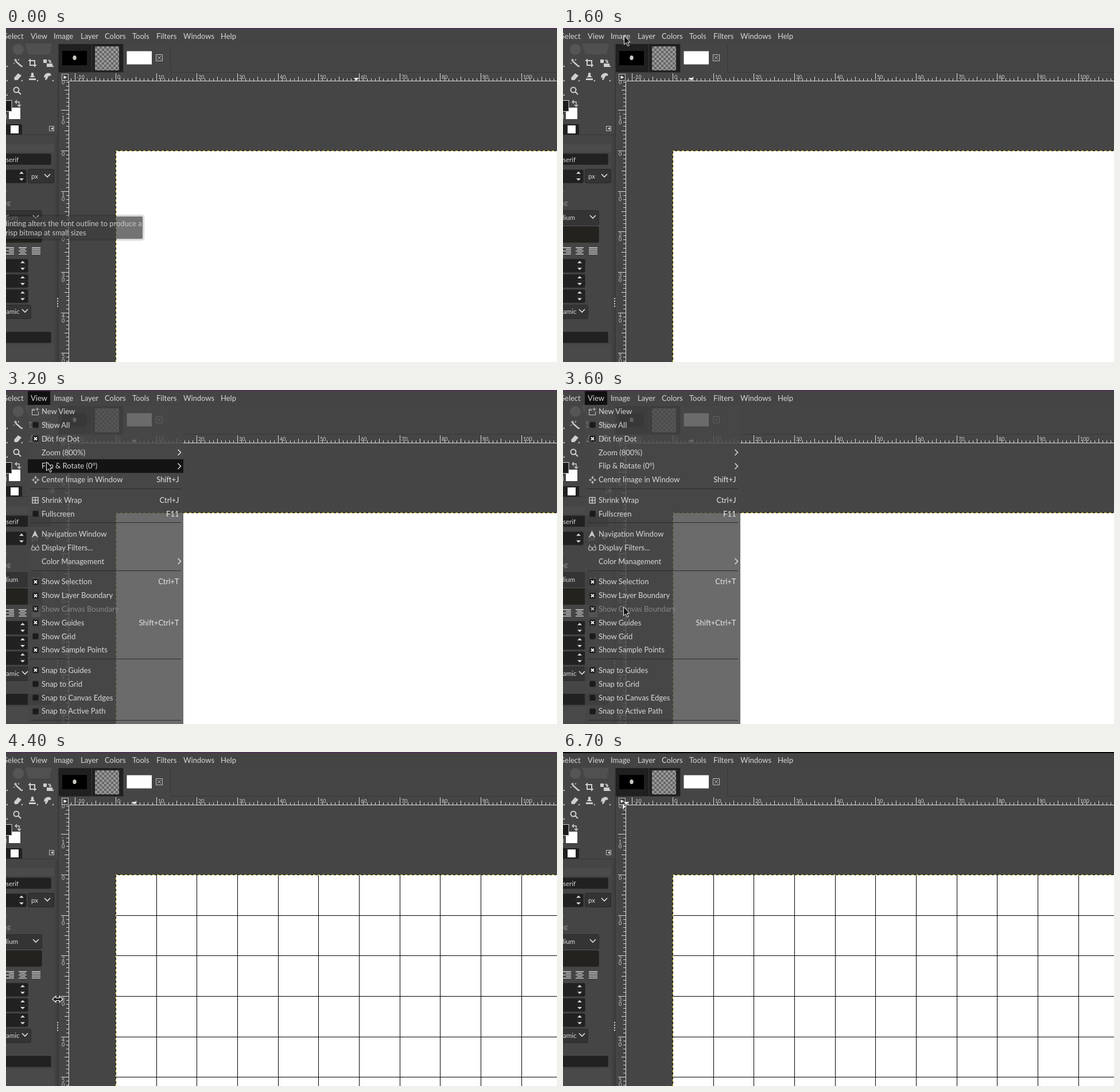
These frames come from a looping animation (960 by 583 pixels, 7.1 s). An HTML page:

```html
<!DOCTYPE html>
<html lang="en">
<head>
<meta charset="utf-8">
<title>Show Grid</title>
<style>
html, body { margin: 0; width: 100%; height: 100%; overflow: hidden; background: #454545; }
svg { display: block; width: 960px; height: 583px; font: 13px Lato, "Noto Sans", sans-serif; }
</style>
</head>
<body>
<svg id="stage" viewBox="0 0 960 583" xmlns="http://www.w3.org/2000/svg"></svg>
<script>
const LOOP = 7100, STEP = 100, W = 960, H = 583;
const CELL = 70.69, X0 = 191.42, Y0 = 214.4;
const INK = '#d8d8d8', DARK = '#212121', BG = '#454545', PURPLE = '#4d3152';
const stage = document.getElementById('stage');

function el(tag, attrs, parent = stage) {
  const n = document.createElementNS('http://www.w3.org/2000/svg', tag);
  for (const k in attrs) n.setAttribute(k, attrs[k]);
  parent.appendChild(n);
  return n;
}
const group = (parent = stage) => el('g', {}, parent);
const rect = (x, y, width, height, fill, parent, more) =>
  el('rect', { x, y, width, height, fill, ...more }, parent);
const fillPath = (d, fill, parent, more) => el('path', { d, fill, ...more }, parent);
const line = (d, stroke, parent, width = 1, more) =>
  el('path', { d, fill: 'none', stroke, 'stroke-width': width, ...more }, parent);
function text(s, x, y, parent, more) {
  const n = el('text', { x, y, fill: INK, ...more }, parent);
  n.textContent = s;
  return n;
}
const show = (n, on) => n.setAttribute('display', on ? 'inline' : 'none');
const move = (n, x, y) => n.setAttribute('transform', `translate(${x} ${y})`);
const gx = u => Math.floor(X0 + CELL * u / 10) + 0.5;
const gy = u => Math.floor(Y0 + CELL * u / 10) + 0.5;

// Window and canvas
rect(0, 0, W, H, BG);
rect(0, 2, W, 26, '#444');
const strip = rect(0, 0, W, 2, PURPLE);
rect(191, 214, 769, 369, '#fff');

const grid = group();
let d = '';
for (let u = 10; u <= 100; u += 10) d += `M${gx(u)} 215V${H}`;
for (let u = 10; u <= 50; u += 10) d += `M192 ${gy(u)}H${W}`;
line(d, '#000', grid);

const edge = 'M191.5 583V214.5M191 214.5H960';
line(edge, '#111');
line(edge, '#f4e23c', stage, 1, { 'stroke-dasharray': '4 4' });

// Image tabs
rect(92, 28, 113, 49, '#202020');
line('M149.5 28V77M204.5 28V77', '#3a3a3a');
line('M286.5 28V77M287 77.5H960M92 77.5H205', '#383838');
rect(98, 40, 43, 25, '#000');
el('ellipse', { cx: 119.5, cy: 52, rx: 3.2, ry: 4, fill: '#c8c8c0' });
const pat = el('pattern', { id: 'chk', width: 8, height: 8, x: 155, y: 32, patternUnits: 'userSpaceOnUse' }, el('defs', {}));
rect(0, 0, 8, 8, '#999', pat);
fillPath('M0 0h4v8h4v-4h-8z', '#666', pat);
rect(155, 32, 42, 42, 'url(#chk)');
rect(210.5, 40.5, 43.5, 23, '#fff');
line('M261.5 46.5h11v11h-11zM264 49l6 6M270 49l-6 6', '#c0c0c0');

// Rulers
function ticks(at, lo, hi, draw) {
  let s = '';
  for (let u = lo; u <= hi; u++) s += draw(at(u), u % 10 === 0 ? 13 : u % 5 === 0 ? 7 : 4);
  return s;
}
line('M110 92.5H960M109.5 93V583' +
  ticks(gx, -11, 108, (p, n) => `M${p} 92v${-n}`) +
  ticks(gy, -17, 52, (p, n) => `M109 ${p}h${-n}`), '#dedede');
const tiny = { 'font-size': 9, fill: '#d0d0d0' };
for (let u = -10; u <= 100; u += 10) text(u, gx(u) + 2.5, 89, stage, tiny);
for (let u = -10; u <= 50; u += 10)
  [...String(u)].forEach((c, i) => text(c, 97, gy(u) + 8 + 8 * i, stage, tiny));
text('0', 97, 98, stage, tiny);
rect(97.5, 80.5, 11, 11, '#3a3a3a', stage, { stroke: '#c8c8c8' });
fillPath('M100.5 83l6 3-6 3z', '#eee');
const markX = fillPath('M-4.5 0h9L0 5z', '#eee');
const markY = fillPath('M0-4.5v9L5 0z', '#eee');

// Toolbox
const dock = group();
rect(0, 28, 90, 555, BG, dock);
rect(90, 28, 2, 555, '#383838', dock);
el('circle', { cx: 21.5, cy: 37.5, r: 9.5, fill: '#555' }, dock);
fillPath('M33 27h47l-4 19H39z', '#505050', dock);
const GREY = '#cfcfcf';
const tool = (s, w = 1.6) => line(s, GREY, dock, w);
tool('M17 58l10 9', 2.4);
tool('M14 56h5M16.5 53.5v5M22 54v3M13 62l2-1', 1.3);
tool('M42 54v11h11M39 57h11v11', 2);
fillPath('M65 55h6v6h-6zM71 62h10v6h-10z', GREY, dock);
tool('M73 56.5h4v4M75 58.5l2 2 2-2', 1.3);
fillPath('M14 87l7-8 6 4-7 8h-5z', GREY, dock);
tool('M17 84l6 4', 1.2);
fillPath('M40 88h12v3H40zM41 86q3-2 3-4-1-4 2-4t2 4q0 2 3 4z', GREY, dock);
fillPath('M67 82q4-5 10-3l2 4-5 1-3 6-3 1 1-5-3 1z', GREY, dock);
tool('M13.5 108a4.5 4.5 0 1 0 9 0a4.5 4.5 0 1 0-9 0M21.5 111.5l4.5 4.5', 2);
for (const [x, y] of [[26, 68], [80, 68], [0, 68], [26, 93], [53, 93], [80, 93], [0, 93], [0, 118]])
  fillPath(`M${x} ${y}h3v-3z`, GREY, dock);

rect(5, 139, 20, 20, '#fff', dock);
rect(-10, 126.5, 20, 19, '#1c1c1c', dock, { stroke: '#d0d0d0' });
tool('M17 129h6v7M19 126l-3 3 3 3M20 134l3 3 3-3', 1.4);
rect(-2, 151, 3, 8, '#aaa', dock);
rect(0, 168, 28, 18, '#202020', dock);
rect(8, 170, 14, 14, '#fff', dock);
rect(75.5, 171.5, 8, 8, 'none', dock, { stroke: '#bbb' });
fillPath('M82 173v5l-4-2.5z', '#ddd', dock);
line('M0 186.5H88.5V583', '#363636', dock);
line('M85.5 187V583', '#3d3d3d', dock);
rect(0, 203, 84, 13, '#4b4b4b', dock);
rect(0, 553, 84, 30, '#494949', dock);

// Option fields
const box = (y, w, h, fill = DARK) =>
  rect(-6, y + 0.5, w + 5.5, h, fill, dock, { rx: 2.5, stroke: '#2c2c2c' });
const chevron = (x, y) => line(`M${x - 5} ${y - 3}l5 5 5-5`, '#e0e0e0', dock, 1.6);
function spin(x, y, w, h) {
  box(y, w, h);
  const c = y + h / 2;
  fillPath(`M${x - 4} ${c - 4}h8l-4-4zM${x - 4} ${c + 4}h8l-4 4z`, '#dcdcdc', dock);
  line(`M${x - 8} ${c + 0.5}H${w - 1}`, '#333', dock);
}
const small = { 'font-size': 11.5 }, dim = { 'font-size': 11.5, fill: '#8d8d8d' };
box(219, 79, 19);
text('serif', 0, 233.5, dock, small);
spin(27, 247, 36, 23);
rect(38.5, 246.5, 45, 24, '#343434', dock, { rx: 2.5, stroke: '#262626' });
text('px', 44, 262.5, dock, small);
chevron(72, 258);
text('.', -1, 286, dock, dim);
text('ng', -4.5, 309, dock, dim);
box(318, 63, 25, '#343434');
text('dium', -4, 335, dock, small);
chevron(52, 330);
box(346, 63, 28, '#23221f');
let rows = '';
for (let i = 0; i < 5; i++) {
  const y = 383.5 + 2.8 * i, cut = i % 2 ? 5 : 0;
  rows += `M${cut} ${y}H14M${22 + cut / 2} ${y}H${36 - cut / 2}M45 ${y}H60`;
}
line(rows, '#d6d6d6', dock, 1.3);
[403, 429.5, 456].forEach(y => spin(29, y, 39, 23));
box(483, 44, 24, '#343434');
text('amic', 0, 499, dock, small);
chevron(33, 494);
box(530, 79, 19);
for (let i = 0; i < 4; i++) rect(89, 471 + 4.5 * i, 2, 2.5, '#c4c4c4', dock);

// Tooltip
const tip = group();
for (let i = 1; i < 4; i++)
  rect(-10 - i, 329 - i, 248 + 2 * i, 39 + 2 * i, 'none', tip, { rx: 3, stroke: '#000', opacity: 0.3 - i * 0.07 });
rect(-10, 329, 248, 39, '#3e3e3e', tip, { rx: 2, opacity: 0.72 });
const faded = { fill: '#c8c8c8' };
text('Hinting alters the font outline to produce a', -7, 345.5, tip, faded);
text('crisp bitmap at small sizes', -7, 362, tip, faded);

// Menu bar
const barLit = rect(38, 2, 39, 24, '#111');
[['Select', -4], ['View', 43], ['Image', 83], ['Layer', 130], ['Colors', 172], ['Tools', 220],
 ['Filters', 262], ['Windows', 309], ['Help', 374]].forEach(([s, x]) => text(s, x, 18.5));

// View menu: label, kind, shortcut, disabled; null is a separator
const ROW = 23.8;
const items = [
  ['New View', 'new'], ['Show All', 'off'], ['Dot for Dot', 'on'], ['Zoom (800%)', 'sub'],
  ['Flip & Rotate (0°)', 'sub'], ['Center Image in Window', 'center', 'Shift+J'], null,
  ['Shrink Wrap', 'wrap', 'Ctrl+J'], ['Fullscreen', 'off', 'F11'], null,
  ['Navigation Window', 'nav'], ['Display Filters...', 'glass'], ['Color Management', 'sub'], null,
  ['Show Selection', 'on', 'Ctrl+T'], ['Show Layer Boundary', 'on'], ['Show Canvas Boundary', 'on', '', true],
  ['Show Guides', 'on', 'Shift+Ctrl+T'], ['Show Grid', 'off'], ['Show Sample Points', 'on'], null,
  ['Snap to Guides', 'on'], ['Snap to Grid', 'off'], ['Snap to Canvas Edges', 'off'], ['Snap to Active Path', 'off'], null
];
const icons = {
  new: g => line('M50 33.5h-4.5v10h11v-6M45.5 35.5h5M54.5 30.5v6M51.5 33.5h6', '#c6c6c6', g),
  center: g => line('M51.5 150v4M51.5 160v4M44.5 157h4M54.5 157h4M49.5 152.5l2 2 2-2M49.5 161.5l2-2 2 2M47 155l2 2-2 2M56 155l-2 2 2 2', '#c6c6c6', g, 1.2),
  wrap: g => line('M46 187.5h10v10H46zM51 187v11M46 192.5h10', '#c6c6c6', g, 1.5),
  nav: g => fillPath('M50.5 245l6 13-6-4-6 4z', '#c6c6c6', g),
  glass: g => line('M44.5 277a3 3 0 1 0 6 0a3 3 0 1 0-6 0M51.5 277a3 3 0 1 0 6 0a3 3 0 1 0-6 0M45 275l2-5M57 275l-2-5', '#b8b8b8', g, 1.2)
};
const menu = group();
rect(38, 28, 271, 555, '#474747', menu, { opacity: 0.8 });
const lit = rect(38, 0, 271, ROW, '#141414', menu);
const hot = [];
let y = 37.6;
for (const it of items) {
  if (!it) {
    line(`M43 ${Math.floor(y - 8) + 0.5}H305`, '#2b2b2b', menu);
    y += 11.8;
    continue;
  }
  const [label, kind, keys, off] = it;
  const c = Math.round(y) + 0.5;
  if (!off) hot.push(y - ROW / 2);
  if (kind === 'on' || kind === 'off') {
    rect(46.5, c - 5.5, 10, 10, '#1b1b1b', menu, { rx: 1.5, stroke: '#2a2a2a' });
    if (kind === 'on') line(`M49 ${c - 3}l5 5M54 ${c - 3}l-5 5`, off ? '#bbb' : '#fff', menu, 1.8);
  } else if (kind === 'sub') line(`M299.5 ${c - 5.5}l5 5-5 5`, '#e0e0e0', menu, 1.5);
  else icons[kind](menu);
  text(label, 62, y + 4.6, menu, off ? { fill: '#878787' } : {});
  if (keys) text(keys, 301.5, y + 4.6, menu, { 'text-anchor': 'end', fill: '#e6e6e6' });
  y += ROW;
}

// Pointers
const arrow = group();
fillPath('M.5 .5V16l3.6-3.3 2.6 5.8 2.5-1.1-2.6-5.7H11z', '#111', arrow, { stroke: '#f4f4f4' });
const resize = group();
fillPath('M-9 0l6-5.5v3.5H3v-3.5L9 0 3 5.5V2h-6v3.5z', '#111', resize, { stroke: '#fff', 'stroke-width': 1.1 });
const cross = group();
for (const [c, w] of [['#222', 3], ['#e8e8e8', 1.1]]) {
  line('M-8 0h5.5M2.5 0H8M0-8v5.5M0 2.5V8', c, cross, w);
  line('M14 10h1.5l1 1 1-1H19M16.5 11v9M14 21h1.5l1-1 1 1H19', c, cross, w);
}

// Pointer path: time, x, y
const path = [
  [200, 560, 328], [500, 400, 195], [800, 223, 87], [900, 206, 3], [1000, 190, 1], [1300, 140, 8],
  [1600, 106, 13], [1700, 95, 14], [1800, 73, 14], [1900, 54, 14], [2200, 54, 14], [2400, 56, 14],
  [2900, 56, 14], [3200, 70, 125], [3500, 101, 345], [3600, 105, 378], [3700, 103, 404], [4100, 90, 431],
  [5000, 90, 431], [5300, 130, 390], [5600, 163, 351], [5800, 157, 320], [6000, 143, 232],
  [6300, 110, 95], [6400, 96, 52], [6500, 78, 14], [6600, 59, -9]
];
const END = 6600;
function pos(t) {
  const i = path.findIndex(p => p[0] >= t);
  if (i < 1) return path[0].slice(1);
  const [a, ax, ay] = path[i - 1], [b, bx, by] = path[i], k = (t - a) / (b - a);
  return [Math.round(ax + (bx - ax) * k), Math.round(ay + (by - ay) * k)];
}
const inCanvas = ([x, y]) => x >= 110 && y >= 86;
const menuOpen = t => t >= 2600 && t < 4400;

// Rulers keep the last place the pointer had over the canvas
function mark(t) {
  for (let s = Math.min(t, END); s >= 200; s -= STEP) {
    const p = pos(s);
    if (!menuOpen(s) && inCanvas(p)) return p;
  }
  return [610, 0];
}

function draw(now) {
  const t = Math.floor((now % LOOP) / STEP) * STEP;
  const open = menuOpen(t);
  const on = t >= 200 && t <= END;
  const p = pos(Math.min(t, END));
  const kind = open ? arrow : inCanvas(p) ? cross : p[0] < 96 && p[1] > 100 ? resize : arrow;
  for (const c of [arrow, resize, cross]) show(c, on && c === kind);
  move(kind, p[0] + (kind === cross ? 0.5 : 0), p[1] + (kind === arrow ? 0 : 0.5));

  const [mx, my] = mark(t);
  move(markX, mx + 0.5, 87);
  move(markY, 104, my + 0.5);
  show(markY, my > 92);

  show(tip, t < 200);
  show(grid, t >= 4400);
  show(menu, open);
  show(barLit, open);
  strip.setAttribute('fill', t >= 6500 ? '#050505' : PURPLE);
  const row = hot.find(h => p[1] >= h && p[1] < h + ROW);
  show(lit, open && row !== undefined);
  if (row !== undefined) lit.setAttribute('y', row);
}
function tick(now) {
  draw(now);
  requestAnimationFrame(tick);
}
draw(0);
requestAnimationFrame(tick);
</script>
</body>
</html>
```
